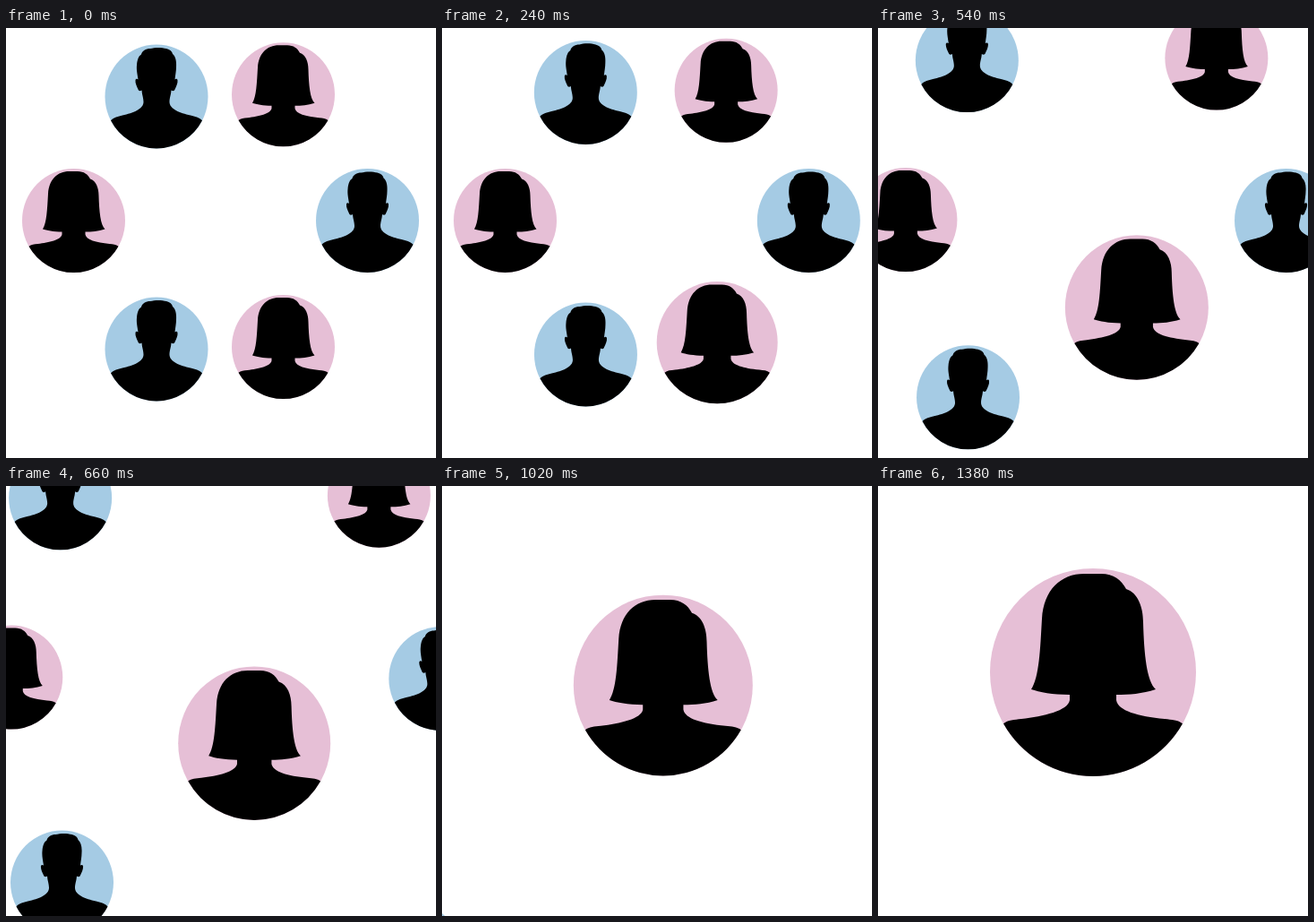
Write an HTML page without scripts that moves like this. It is 480 px wide and 480 px high and loops after 1440 ms.

```html
<!DOCTYPE html>
<html lang="en">
<head>
<meta charset="utf-8">
<title>One from the circle</title>
<style>
  @property --tick { syntax: "<number>"; inherits: true; initial-value: 0; }
  @property --v { syntax: "<number>"; inherits: true; initial-value: 0; }
  @property --move { syntax: "<number>"; inherits: true; initial-value: 0; }

  html, body { margin: 0; width: 100%; height: 100%; overflow: hidden; background: #fff; }

  svg {
    display: block;
    width: 480px;
    height: 480px;
    animation: tick 1440ms steps(24) -1ms infinite;
    /* ease in and out: a blend of a quadratic curve and a smoothstep */
    --v: clamp(0, .5 + (var(--tick) - 11.38) / 19.5, 1);
    --a: min(var(--v), .5);
    --b: min(1 - var(--v), .5);
    --quad: (.5 + 2 * var(--a) * var(--a) - 2 * var(--b) * var(--b));
    --smooth: (var(--v) * var(--v) * (3 - 2 * var(--v)));
    --move: calc(.67 * var(--quad) + .33 * var(--smooth));
  }
  @keyframes tick { to { --tick: 24; } }

  .person {
    --size: .5;
    transform:
      translate(calc((var(--x) + var(--dx) * var(--move)) * 1px),
                calc((var(--y) + var(--dy) * var(--move)) * 1px))
      scale(var(--size));
  }
  .chosen { --size: calc(.5 + var(--tick) / 46); }
</style>
</head>
<body>
<svg viewBox="0 0 480 480">
  <defs>
    <g id="man">
      <ellipse rx="115" ry="116" fill="#a5cbe4"/>
      <path d="M-102,53.6 C-95,46 -86,45 -76,42 C-52,37 -29,28 -29,12 C-29,3 -32,-2 -33,-14
        C-36,-12 -40,-12 -41,-16 C-44,-23 -48,-30 -47,-37 C-46,-40 -43,-40 -41,-38
        C-43,-52 -45,-60 -44,-70 C-43,-84 -39,-91 -34,-94 C-32,-102 -24,-107 -14,-107
        C-4,-110 12,-110 22,-107 C30,-105 35,-101 36,-95 C42,-90 45,-80 44,-66
        C44,-56 42,-48 41,-38 C43,-40 46,-40 47,-37 C48,-30 44,-23 41,-16
        C40,-12 36,-12 33,-14 C32,-2 29,3 29,12 C29,28 52,37 76,42 C86,45 95,46 102,53.6
        A115,116 0 0 1 -102,53.6Z"/>
    </g>
    <g id="woman">
      <ellipse rx="115" ry="116" fill="#e6bfd6"/>
      <path d="M-100,57.3 C-95,53 -88,53 -80,52 C-55,49 -28,43 -26,31 V25
        C-45,25 -60,22 -69,19 C-60,5 -59,-25 -57,-60 C-55,-92 -36,-110 -10,-110 H9
        C23,-110 32,-103 37,-93 C50,-89 56,-73 56,-56 C57,-20 60,10 70,19
        C55,24 40,25 26,25 V31 C28,43 50,49 80,52 C88,53 95,53 100,57.3
        A115,116 0 0 1 -100,57.3Z"/>
    </g>
  </defs>
  <use href="#man" class="person" style="--x:168; --y:76.5; --dx:-231; --dy:-136"/>
  <use href="#woman" class="person" style="--x:309.5; --y:74.3; --dx:230; --dy:-137"/>
  <use href="#woman" class="person" style="--x:75.5; --y:215; --dx:-150; --dy:-3"/>
  <use href="#man" class="person" style="--x:403.5; --y:215; --dx:175; --dy:0"/>
  <use href="#man" class="person" style="--x:168; --y:358.5; --dx:-227; --dy:181"/>
  <use href="#woman" class="person chosen" style="--x:309.5; --y:356; --dx:-69.5; --dy:-148"/>
</svg>
</body>
</html>
```
